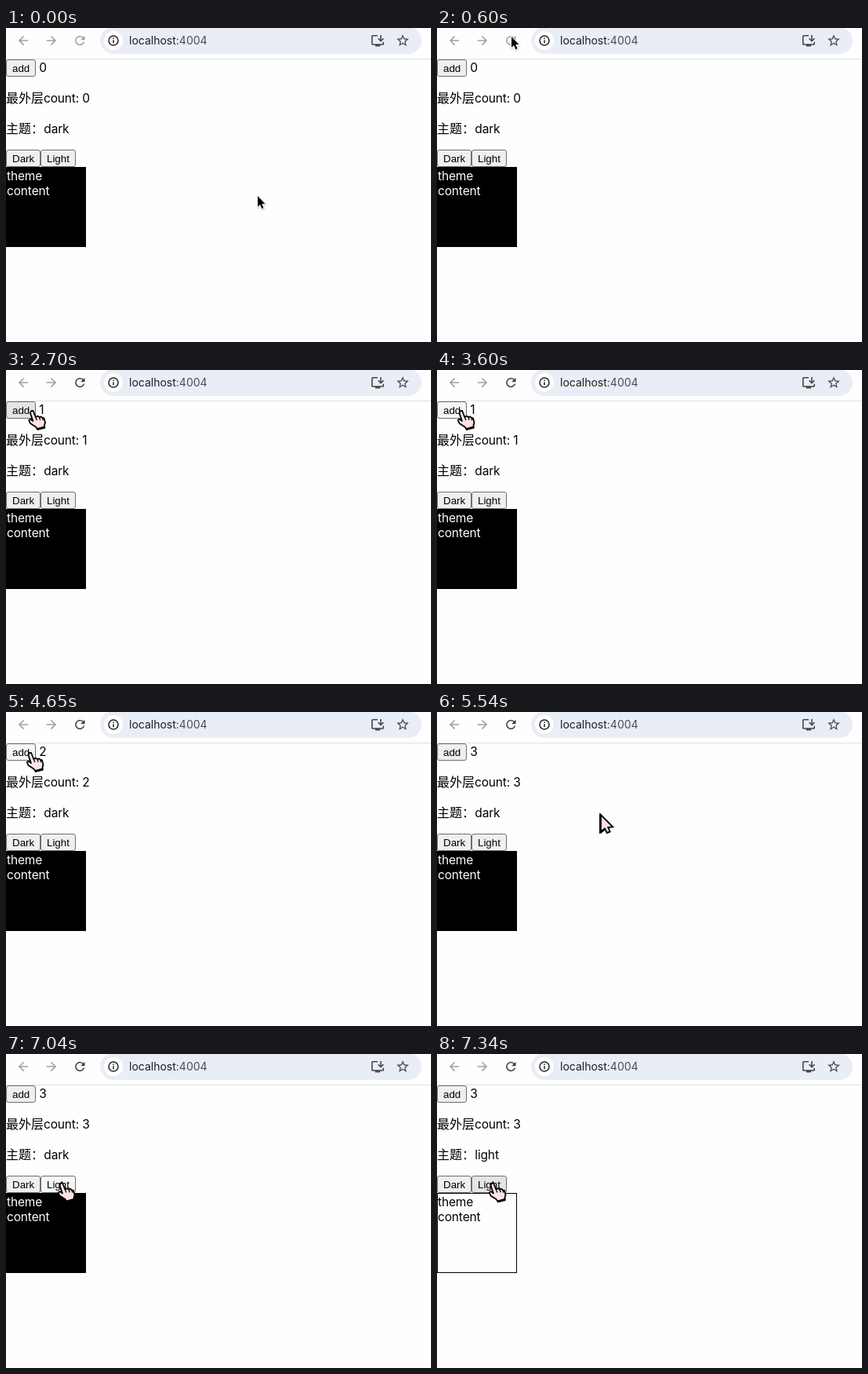
Write an HTML page that moves like this. It is 542 by 400 pixels and loops after 8 s.

```html
<!DOCTYPE html>
<html lang="zh">
<head>
<meta charset="utf-8">
<title>Theme demo</title>
<style>
  html, body { margin: 0; width: 100%; height: 100%; overflow: hidden; background: #fefefe; }
  svg { display: block; width: 542px; height: 400px; }
  .page { font: 15.5px Inter, "Noto Sans", sans-serif; letter-spacing: -.15px; }
  .cjk { font: 16px "Noto Sans CJK SC", "Noto Sans CJK", sans-serif; letter-spacing: 0; }
  .url { font: 14px Inter, "Noto Sans", sans-serif; fill: #1f1f1f; }
  .btn text { font: 13.333px "Liberation Sans", Arial, sans-serif; }
  .btn rect { stroke: #6f6f6f; }
</style>
</head>
<body>
<svg viewBox="0 0 542 400">
  <defs>
    <g id="mac" stroke-linejoin="round">
      <path d="M0 0V13.8L3.1 11 5.3 16.2 7.5 15.3 5.3 10.1H9.5Z" stroke="#aaa" stroke-opacity=".35" stroke-width="3.6" transform="translate(.3 .8)"/>
      <path d="M0 0V13.8L3.1 11 5.3 16.2 7.5 15.3 5.3 10.1H9.5Z" stroke="#fff" stroke-width="2" paint-order="stroke"/>
    </g>
    <g id="arrow" stroke="#000">
      <path d="M1.4 1.6V24.4L7 19.6 9.8 25 13.6 23.4 11.2 18 17.2 17.2Z" fill="#fbdfe1" stroke-width="1.9"/>
      <path d="M1.4 1V25.6M2.2 24L6.6 20.2" fill="none" stroke-width="2.8"/>
    </g>
    <g id="hand" stroke="#000" stroke-linejoin="round">
      <path d="M4 1.2 6.6 1 9.8 9 12.5 7.6 14.6 9.2 16.8 8.4 18.6 10.2 20.4 10.2 22 16 21 19.6 21.4 22.6 12.4 25 10 21.6 3 17 1.2 13 3.2 11.6 6.4 14 3 4Z" fill="#fde3e4" stroke-width="1.8"/>
      <path d="M9.8 9 11.4 13M14.6 9.4 15.6 12.8M18.6 10.4 19.2 13.2" fill="none" stroke-width="1.3"/>
      <path d="M12 24.2 21 21.8" stroke-width="2.6"/>
    </g>
    <path id="back" d="M20 11H7.83l5.59-5.59L12 4l-8 8 8 8 1.41-1.41L7.83 13H20z"/>
  </defs>

  <rect width="542" height="400" fill="#fefefe"/>
  <rect y="39" width="542" height="1" fill="#dfe0e2"/>
  <g fill="#a0a0a0">
    <use href="#back" transform="translate(12.8 6.8) scale(.77)"/>
    <use href="#back" transform="translate(67.2 6.8) scale(-.77 .77)"/>
  </g>
  <path id="reload" transform="translate(85.1 6.8) scale(.77)" d="M17.65 6.35C16.2 4.9 14.21 4 12 4c-4.42 0-7.99 3.58-7.99 8s3.57 8 7.99 8c3.73 0 6.84-2.55 7.73-6h-2.08c-.82 2.33-3.04 4-5.65 4-3.31 0-6-2.69-6-6s2.69-6 6-6c1.66 0 3.14.69 4.22 1.78L13 11h7V4z"/>
  <rect x="120" y="-1" width="410" height="34" rx="17" fill="#e9edf6"/>
  <circle cx="137" cy="16" r="12" fill="#fff"/>
  <circle cx="137" cy="16" r="6" fill="none" stroke="#222" stroke-width="1.5"/>
  <path d="M137 15.2V19.2M137 12.6V14" stroke="#222" stroke-width="1.5"/>
  <text class="url" x="157" y="21">localhost<tspan fill="#4b4d52">:4004</tspan></text>
  <g fill="#444749">
    <path transform="translate(464.4 6.6) scale(.8)" d="M20 17H4V5h8V3H4c-1.1 0-2 .9-2 2v12c0 1.1.9 2 2 2h4v2h8v-2h4c1.1 0 2-.9 2-2v-3h-2zM17 14l5-5-1.41-1.41L18 10.17V3h-2v7.17l-2.59-2.58L12 9z"/>
    <path transform="translate(496.6 6.6) scale(.78)" d="M22 9.24l-7.19-.62L12 2 9.19 8.63 2 9.24l5.46 4.73L5.82 21 12 17.27 18.18 21l-1.63-7.03zM12 15.4l-3.76 2.27 1-4.28-3.32-2.88 4.38-.38L12 6.1l1.71 4.04 4.38.38-3.32 2.88 1 4.28z"/>
  </g>

  <g class="btn" id="add"><rect x=".5" y="40.5" width="37" height="21" rx="2.5"/><text x="8" y="55.5">add</text></g>
  <g class="btn" id="dark"><rect x=".5" y="155.5" width="43" height="21" rx="2.5"/><text x="8" y="170.5">Dark</text></g>
  <g class="btn" id="light"><rect x="44.5" y="155.5" width="44" height="21" rx="2.5"/><text x="52" y="170.5">Light</text></g>

  <g class="page">
    <text id="count" x="42.3" y="56"></text>
    <text class="cjk" x="0" y="95">最外层</text>
    <text id="outer" x="48" y="95"></text>
    <text class="cjk" x="0" y="134">主题：</text>
    <text id="theme" x="48.3" y="134"></text>
    <rect id="box" x=".5" y="177.5" width="101" height="101" stroke="#000"/>
    <g id="boxText"><text x="1" y="194">theme</text><text x="1" y="213">content</text></g>
  </g>
  <use id="cursor"/>
</svg>
<script>
const LOOP = 8000;
const $ = id => document.getElementById(id);

// [time, x, y, shape]
const CURSOR = [
  [0, 321, 214, "mac"], [150, 292, 182, "mac"], [300, 205, 95, "mac"], [450, 125, 27, "mac"],
  [600, 95, 11, "mac"], [750, 92, 12, "mac"], [900, 58, 26, "mac"], [1050, 29, 50, "mac"],
  [1200, 28, 50, "mac"], [2250, 28, 51, "hand"], [3300, 25.5, 51, "hand"],
  [5240, 92, 84, "arrow"], [5390, 176, 117, "arrow"], [5540, 207, 129, "arrow"],
  [5690, 211, 133, "arrow"], [5840, 184, 143, "arrow"], [5990, 145, 154, "arrow"],
  [6140, 115, 162, "arrow"], [6290, 96, 162, "arrow"], [6440, 65.5, 163.5, "hand"]
];
const COUNT = [[0, 0], [2700, 1], [3750, 2], [4950, 3]];
const IDLE = "#efefef", HOVER = "#e4e4e4", DOWN = "#f6f6f6";
const ADD = [[0, IDLE], [2250, HOVER], [2550, DOWN], [2700, HOVER], [3600, DOWN],
  [3750, HOVER], [4650, DOWN], [4950, HOVER], [5240, IDLE]];
const LIGHT = [[0, IDLE], [6440, HOVER], [7040, DOWN], [7340, HOVER]];

const at = (steps, t) => steps.findLast(s => s[0] <= t);
const paint = (id, color) => $(id).firstElementChild.setAttribute("fill", color);

function render(t) {
  const [, x, y, shape] = at(CURSOR, t);
  $("cursor").setAttribute("href", "#" + shape);
  $("cursor").setAttribute("transform", `translate(${x} ${y})`);

  const count = at(COUNT, t)[1];
  $("count").textContent = count;
  $("outer").textContent = "count: " + count;

  paint("add", at(ADD, t)[1]);
  paint("dark", IDLE);
  paint("light", at(LIGHT, t)[1]);

  const light = t >= 7340;
  $("theme").textContent = light ? "light" : "dark";
  $("box").setAttribute("fill", light ? "#fefefe" : "#000");
  $("boxText").setAttribute("fill", light ? "#000" : "#fff");
  $("reload").setAttribute("fill", t < 1650 ? "#a0a0a0" : "#3c3e40");
}

const start = performance.now();
function tick() {
  render((performance.now() - start) % LOOP);
  requestAnimationFrame(tick);
}
tick();
</script>
</body>
</html>
```
